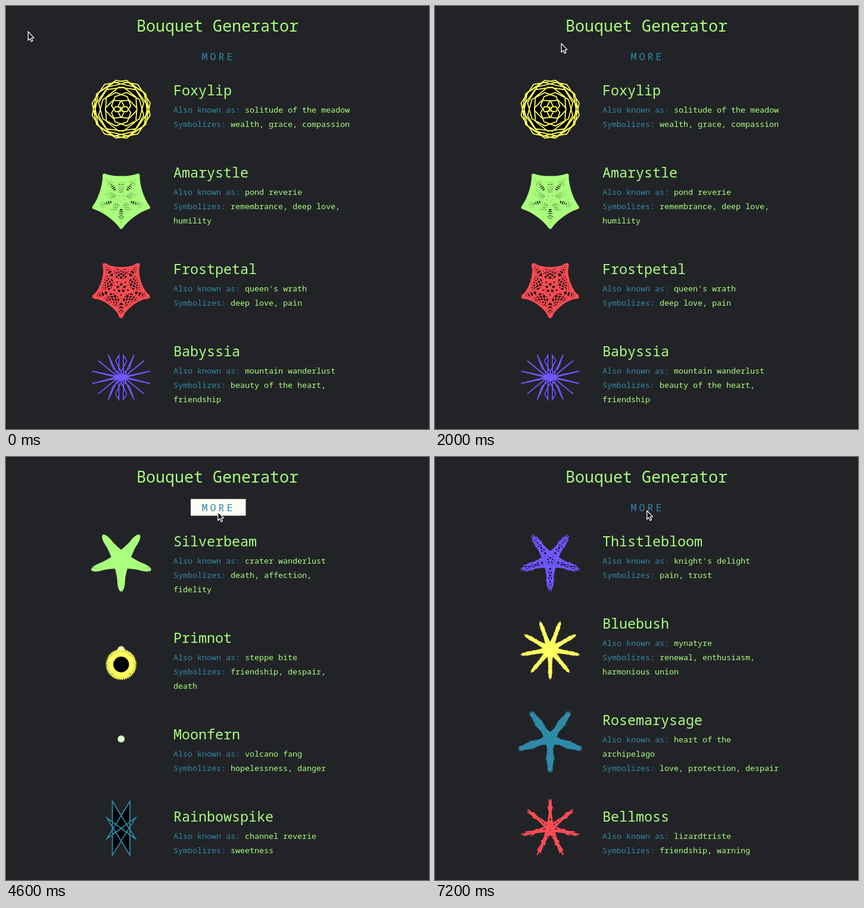
Recreate the animation shown at these times as an HTML page with a canvas. Size 710 by 710 pixels, loop 7.3 s.

```html
<!DOCTYPE html>
<html>
<head>
<meta charset="utf-8">
<style>
html, body { margin: 0; height: 100%; overflow: hidden; background: #222327; }
canvas { display: block; }
</style>
</head>
<body>
<canvas id="stage" width="710" height="710"></canvas>
<script>
const ctx = document.getElementById('stage').getContext('2d');
const LOOP = 7300;
const GREEN = '#aaff7d', TEAL = '#2f8aa8', YELLOW = '#ffff5f', RED = '#ff4d55', VIOLET = '#7058ff';

// Each flower: name, other name, meaning ("|" breaks a line), colour, petals n, step angle d
const bouquets = [
  { from: 0, flowers: [
    ['Foxylip', 'solitude of the meadow', 'wealth, grace, compassion', YELLOW, 8, 44],
    ['Amarystle', 'pond reverie', 'remembrance, deep love,|humility', GREEN, 5, 79],
    ['Frostpetal', "queen's wrath", 'deep love, pain', RED, 5, 82],
    ['Babyssia', 'mountain wanderlust', 'beauty of the heart,|friendship', VIOLET, 8, 12]
  ] },
  { from: 3200, flowers: [
    ['Silverbeam', 'crater wanderlust', 'death, affection,|fidelity', GREEN, 5, 31],
    ['Primnot', 'steppe bite', 'friendship, despair,|death', YELLOW, 1, 56],
    ['Moonfern', 'volcano fang', 'hopelessness, danger', GREEN, 0, 0],
    ['Rainbowspike', 'channel reverie', 'sweetness', TEAL, 4, 36]
  ] },
  { from: 5100, flowers: [
    ['Nightbloom', 'waterfall fang', 'spiritual enlightenment,|sweetness, love at first sight', GREEN, 6, 61],
    ['Waterzinnia', 'okapiragi', 'warning, sincerity', VIOLET, 5, 79],
    ['Mystrose', 'tuatarami', 'charm, sweetness,|strength', '#a792c8', 0, 0],
    ['Silverthorn', 'pangolinbola', 'perseverance', '#a792c8', 0, 0]
  ] },
  { from: 6900, flowers: [
    ['Thistlebloom', "knight's delight", 'pain, trust', VIOLET, 5, 28],
    ['Bluebush', 'mynatyre', 'renewal, enthusiasm,|harmonious union', YELLOW, 9, 14],
    ['Rosemarysage', 'heart of the|archipelago', 'love, protection, despair', TEAL, 5, 23],
    ['Bellmoss', 'lizardtriste', 'friendship, warning', RED, 7, 16]
  ] }
];

// Pointer path: time, x, y
const path = [
  [0, 36.5, 42], [1500, 36.5, 42], [1600, 106, 49], [2000, 211.5, 62], [2500, 312, 86],
  [3000, 345, 91], [3400, 355, 91], [5600, 355, 91], [5900, 355, 99],
  [6500, 355, 99], [6800, 355, 89], [LOOP, 355, 89]
];

function text(str, x, y, size, color) {
  ctx.font = `500 ${size}px "Noto Sans Mono", monospace`;
  ctx.fillStyle = color;
  ctx.fillText(str, x, y);
}

// Maurer rose: chords between points of r = sin(n * angle), taken every d degrees
function rose(n, d, color) {
  const gcd = (a, b) => b ? gcd(b, a % b) : a;
  ctx.beginPath();
  for (let i = 0; i < 360 / gcd(d, 360); i++) {
    const a = i * d * Math.PI / 180, r = 50 * Math.sin(n * a);
    ctx.lineTo(r * Math.cos(a), r * Math.sin(a));
  }
  ctx.closePath();
  ctx.fillStyle = '#000';
  ctx.fill();
  ctx.strokeStyle = color;
  ctx.lineWidth = 1.8;
  ctx.stroke();
}

function bud(color) {
  ctx.beginPath();
  ctx.arc(0, 0, 5.3, 0, 7);
  ctx.fillStyle = '#f0ecee';
  ctx.fill();
  ctx.strokeStyle = color;
  ctx.lineWidth = 1.4;
  ctx.stroke();
}

function flower(index, [, , , color, n, d]) {
  ctx.save();
  ctx.translate(193.3, 173.2 + index * 150);
  if (n < 2) bud(color);
  if (n) rose(n, d, color);
  ctx.restore();
}

function entry(y, [name, alias, meaning]) {
  text(name, 281, y, 23.333, GREEN);
  let line = y + 29;
  for (const [label, value] of [['Also known as: ', alias], ['Symbolizes: ', meaning]]) {
    text(label, 281, line, 13.333, TEAL);
    value.split('|').forEach((part, i) => {
      text(part, i ? 281 : 281 + label.length * 8, line, 13.333, GREEN);
      line += 24;
    });
  }
  return line + 61;
}

function button(hover) {
  if (hover) {
    ctx.fillStyle = '#fdfcf4';
    ctx.fillRect(310, 70.5, 92.5, 28);
  }
  ctx.letterSpacing = '4px';
  text('MORE', 328.5, 91, 16.667, TEAL);
  ctx.letterSpacing = '0px';
}

function pointer(t) {
  const i = path.findIndex(p => p[0] > t);
  const [t0, x0, y0] = path[i - 1], [t1, x1, y1] = path[i];
  const k = (t - t0) / (t1 - t0);
  ctx.save();
  ctx.translate(x0 + (x1 - x0) * k, y0 + (y1 - y0) * k);
  ctx.beginPath();
  for (const [x, y] of [[.7, 1], [.7, 15.5], [3.8, 12.6], [6, 17.6], [8.4, 16.5], [6.3, 11.6], [10.4, 11.4]])
    ctx.lineTo(x, y);
  ctx.closePath();
  ctx.fillStyle = '#111';
  ctx.fill();
  ctx.strokeStyle = '#fff';
  ctx.lineWidth = 1.3;
  ctx.lineJoin = 'round';
  ctx.stroke();
  ctx.restore();
}

function draw(now) {
  const t = Math.floor(now % LOOP / 100) * 100;
  ctx.fillStyle = '#222327';
  ctx.fillRect(0, 0, 710, 710);
  ctx.fillStyle = '#252228';
  ctx.fillRect(0, 706, 710, 4);

  text('Bouquet Generator', 219, 43, 26.667, GREEN);
  button(t >= 2500 && t < 5900);

  const { flowers } = bouquets.findLast(b => t >= b.from);
  let y = 149.5;
  flowers.forEach((f, i) => {
    flower(i, f);
    y = entry(y, f);
  });
  pointer(t);
}

function tick(now) {
  draw(now);
  requestAnimationFrame(tick);
}
draw(0);
requestAnimationFrame(tick);
</script>
</body>
</html>
```
